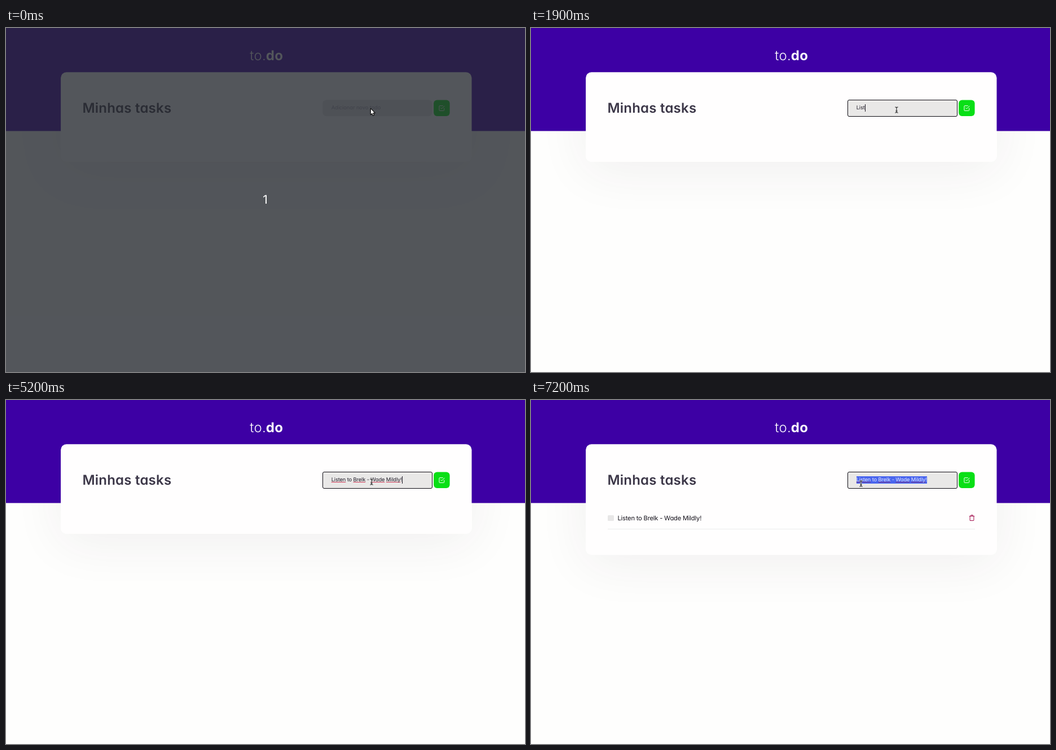
Recreate the animation shown at these times as an HTML page. Size 920 px wide and 609 px high, loop 8 s.

```html
<!DOCTYPE html>
<html lang="pt">
<head>
<meta charset="utf-8">
<title>to.do</title>
<style>
html, body { margin: 0; width: 100%; height: 100%; overflow: hidden; background: #fefefd; }
body {
  position: relative;
  font-family: Inter, "Open Sans", sans-serif;
  font-feature-settings: "cv11";
  text-rendering: geometricPrecision;
}
div, svg { position: absolute; }
.text { white-space: pre; }
svg { left: 0; top: 0; width: 920px; height: 609px; fill: none; stroke-linecap: round; stroke-linejoin: round; }
#shadow { left: 97px; top: 78px; width: 729px; border-radius: 10px; box-shadow: 0 15px 90px rgba(50, 45, 55, .07); }
#logo { left: 432.3px; top: 34px; font-size: 24px; line-height: 29px; font-weight: 300; letter-spacing: .2px; color: #fff; }
#logo b { font-weight: 700; }
#title { left: 135.4px; top: 127px; font-size: 24px; line-height: 29px; font-weight: 600; letter-spacing: .22px; color: #3c3748; }
#ring { left: 561px; top: 127px; width: 195px; height: 30px; box-sizing: border-box; border: 1.6px solid #0d0b12; border-radius: 3px; background: #e9e8e7; }
#hint, #value { left: 576.7px; top: 135px; height: 13px; font-size: 9.3px; line-height: 13px; }
#hint { color: #a09cad; letter-spacing: -.06px; }
#value { color: #1e1a26; letter-spacing: -.12px; }
#value u { text-decoration: underline 1px #cf3b58; text-underline-offset: 1px; text-decoration-skip-ink: none; }
#value i { display: inline-block; width: 1px; height: 13px; margin-right: -1px; vertical-align: top; background: #17131f; }
#value.selected { background: #4a66ee; color: #e6e8ff; }
#value.selected u { text-decoration-color: #7a2f7c; }
#box { left: 136px; top: 204px; width: 10.6px; height: 10.4px; border-radius: 1.5px; background: #e8e7e7; }
#task { left: 153.4px; top: 202px; font-size: 11.2px; line-height: 14px; letter-spacing: -.2px; color: #15121b; }
#line { left: 136px; top: 228px; width: 651px; height: 1px; background: #ececec; }
#veil { left: 0; top: 0; width: 100%; height: 100%; background: rgba(37, 41, 48, .79); }
#count { left: 0; width: 919px; top: 292px; text-align: center; font-size: 21px; line-height: 26px; color: #fff; }
</style>
</head>
<body>
<div id="shadow"></div>
<svg>
  <rect width="920" height="182.4" fill="#3d00a4"/>
  <rect id="card" x="97.1" y="78.2" width="728.4" rx="10" fill="#fffefe"/>
  <rect x="561.5" y="127.6" width="193.8" height="28.5" rx="6" fill="#e9e8e7"/>
  <rect id="button" x="758.1" y="127.6" width="28.5" height="28.5" rx="6" fill="#09df16"/>
  <g transform="translate(766.5 136.2) scale(.486)" stroke="#fff" stroke-width="2">
    <path d="M9 11l3 3L22 4M21 12v7a2 2 0 0 1-2 2H5a2 2 0 0 1-2-2V5a2 2 0 0 1 2-2h11"/>
  </g>
</svg>
<div id="logo" class="text">to.<b>do</b></div>
<div id="title" class="text">Minhas tasks</div>
<div id="ring"></div>
<div id="hint" class="text">Adicionar novo todo</div>
<div id="value" class="text"></div>
<div id="row">
  <div id="box"></div>
  <div id="task" class="text"></div>
  <div id="line"></div>
  <svg>
    <g transform="translate(775.7 202.9) scale(.486)" stroke="#a3124f" stroke-width="2.1">
      <path d="M3 6H21M19 6v14a2 2 0 0 1-2 2H7a2 2 0 0 1-2-2V6m3 0V4a2 2 0 0 1 2-2h4a2 2 0 0 1 2 2v2"/>
    </g>
  </svg>
</div>
<div id="veil"><div id="count">1</div></div>
<svg><g id="pointer"><path id="under"/><path id="over"/></g></svg>

<script>
const LOOP = 8000, STEP = 100;
const TASK = 'Listen to Brelk - Wade Mildly!';
const $ = id => document.getElementById(id);
const show = (id, on) => { $(id).style.display = on ? '' : 'none'; };

// [time, characters in the field]
const KEYS = [[500, 0], [1400, 1], [1600, 2], [1700, 3], [1900, 4], [2000, 5], [2100, 6],
  [2900, 7], [3200, 9], [3700, 10], [4000, TASK.length - 1], [5200, TASK.length]];

// [time, x, y]
const MOVES = [[0, 648, 145], [5500, 690, 147], [5600, 749, 149], [5800, 764, 149],
  [5900, 770, 148], [6000, 772, 147], [6400, 761, 149], [6500, 700, 149],
  [6600, 622, 148], [6700, 585, 148]];

const BEAM = 'M-2.4-5Q-.5-5 0-4Q.5-5 2.4-5M-2.4 5Q-.5 5 0 4Q.5 5 2.4 5M0-4V4M-1.4 2H1.4';
const ARROW = 'M-1.5-2V8.2L.9 6L2.5 9.8L4.2 9L2.6 5.4H5.7Z';
const HAND = 'M-2-3Q-2-4-1-4Q0-4 0-3V.2Q1-.2 1.8.6Q2.8.2 3.4 1.1Q4.8.8 4.8 2.2V4.5L4 7.5H-1.8' +
  'L-4.6 3.6Q-5.2 2.4-4 2Q-3 2-2 3.2Z';

const CARET = '<i></i>';
const latest = (list, t) => list.filter(e => e[0] <= t).pop();

function paint(id, d, fill, stroke, width) {
  const a = { d, fill, stroke, 'stroke-width': width };
  for (const k in a) $(id).setAttribute(k, a[k]);
}

function drawPointer(t) {
  const [, x, y] = latest(MOVES, t);
  $('pointer').setAttribute('transform', `translate(${x} ${y})`);
  if (t >= 100 && x < 757) {
    paint('under', BEAM, 'none', '#fff', 2.2);
    paint('over', BEAM, 'none', '#111', 1.1);
  } else {
    const d = t < 100 ? ARROW : HAND;
    paint('under', d, 'none', '#000', 1.6);
    paint('over', d, '#fff', '#000', .7);
  }
}

function drawField(t) {
  const focused = t >= 500 && t < 6100 || t >= 6900;
  const selected = t >= 7200;
  const [since, length] = latest(KEYS, t) || [0, 0];
  const text = TASK.slice(0, length);
  const again = t >= 6900;
  const blink = Math.floor((t - (again ? 6900 : since)) / 600) % 2 === 0;
  const at = again ? 2 : length;

  const mark = s => focused && length > 6
    ? s.replace(/Listen|Brelk|Wade|Mildly|^Li$|^sten/g, '<u>$&</u>') : s;
  const caret = focused && !selected && blink ? CARET : '';
  $('value').innerHTML = caret ? mark(text.slice(0, at)) + caret + mark(text.slice(at)) : mark(text);
  $('value').className = selected ? 'text selected' : 'text';
  show('ring', focused);
  show('hint', !length);
}

function draw(t) {
  const added = t >= 6300;
  const height = added ? 196 : 158.6;
  $('card').setAttribute('height', height);
  $('shadow').style.height = height + 'px';
  show('row', added);
  show('veil', t < 100);

  const x = latest(MOVES, t)[1];
  const hover = x > 757 ? Math.min(1, (t - 5700) / 200) : 0;
  $('button').style.filter = `brightness(${1 - .06 * hover})`;

  drawField(t);
  drawPointer(t);
}

$('task').textContent = TASK;
const start = performance.now();
let last = -1;

function frame() {
  const t = Math.floor((performance.now() - start) % LOOP / STEP) * STEP;
  if (t !== last) draw(last = t);
  requestAnimationFrame(frame);
}
frame();
</script>
</body>
</html>
```
